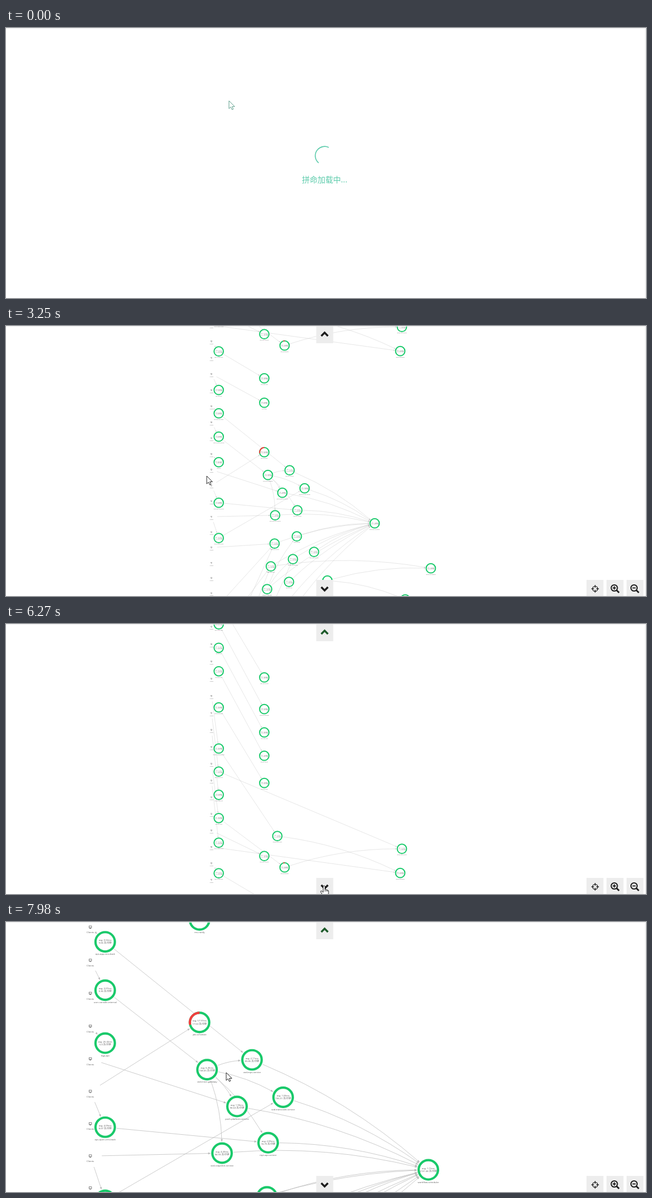
These frames come from a looping animation (1151 px wide and 486 px high, 8 s). An HTML page with a canvas:

```html
<!DOCTYPE html>
<html lang="zh">
<head>
<meta charset="utf-8">
<title>Service map</title>
<style>
html, body { margin: 0; width: 100%; height: 100%; overflow: hidden; background: #fff; }
canvas { display: block; }
</style>
</head>
<body>
<canvas id="stage" width="1151" height="486"></canvas>
<script>
const ctx = document.getElementById('stage').getContext('2d');
const W = 1151, H = 486, LOOP = 8000, READY = 300;
const CX = 573, CY = 270.5, NOTCH = 1.275, CLICK_SCROLL = 100.75, R = 8.4;
const GREEN = '#19c96a', RED = '#f23d3d', TEAL = '#5ccbab', INK = '#1d1d1d', EDGE = '#bababa';
const CJK = '"Noto Sans CJK SC", "Noto Sans CJK", sans-serif';

// Wheel notches, each zooming in by one step
const NOTCHES = [1690, 1840, 2790, 2860, 3010, 3250, 7820, 7900, 7970];
// Clicks as [press, release]
const UP_CLICKS = [[4080, 4160], [4480, 4630], [4950, 5030], [5100, 5270]];
const DOWN_CLICKS = [[6280, 6340], [6420, 6490], [6570, 6750], [6820, 6880]];
// Pointer stops as [arrive, leave, x, y]
const STOPS = [[0, 70, 401, 131], [300, 300, 354, 190], [540, 1230, 397, 231], [1310, 2240, 420, 241],
  [2320, 2320, 414, 259], [2650, 3010, 319, 270], [3250, 3400, 361, 270], [3930, 5570, 573, 21],
  [6240, 7190, 572, 472], [7690, LOOP, 396, 271]];

const zoomAt = t => NOTCH ** (NOTCHES.filter(at => t >= at).length - 6);
const released = (clicks, t) => clicks.filter(c => t >= c[1]).length;
const scrollAt = t => CLICK_SCROLL * (released(UP_CLICKS, t) - released(DOWN_CLICKS, t));
const pressedAt = t => [...UP_CLICKS, ...DOWN_CLICKS].some(([a, b]) => t >= a && t < b);

function pointerAt(t) {
  const i = STOPS.findLastIndex(s => t >= s[0]);
  const [, leave, x, y] = STOPS[i];
  if (t <= leave || i === STOPS.length - 1) return [x, y];
  const [arrive, , nx, ny] = STOPS[i + 1];
  const k = (t - leave) / (arrive - leave);
  return [x + (nx - x) * k, y + (ny - y) * k];
}

let seed = 7;
const rand = () => (seed = (seed * 16807) % 2147483647) / 2147483647;
const pick = list => list[Math.floor(rand() * list.length)];

// Graph: services stand in evenly spaced rows; each id is a group letter and an index
const groups = {}, edges = [], clients = [];
function row(group, x, y, count = 1, dy = 0, dx = 0) {
  const list = groups[group] ??= [];
  for (let i = 0; i < count; i++) list.push({
    x: x + dx * i, y: y + dy * i + 0.2, err: 0,
    avg: (rand() * 20 + 0.5).toFixed(2),
    rate: (rand() * 90 + 1).toFixed(2),
    name: pick(['vod', 'ops', 'media', 'user', 'log']) + '-' + pick(['auth', 'task', 'file', 'index', 'config'])
      + pick(['-service', '-api', '-back', '-gateway'])
  });
}
const node = id => groups[id[0]][id.slice(1)];

const entry = (...run) => row('A', 382.6, ...run);
entry(-445, 4, 42.3);
entry(-253, 2, 74);
entry(-137.5, 3, 41.8);
entry(-9.5, 2, 55);
entry(115, 3, 42);
entry(245, 2, 73);
entry(381.5);
entry(502, 14, 54.6);

const inner = (...run) => row('B', 464.5, ...run);
inner(-433);
inner(-307, 2, 57);
inner(-208, 2, 42);
inner(-117);
inner(14.5);
inner(94, 2, 44);
inner(227);
inner(709, 9, 53);

row('G', 471, 268);
row('H', 663, 355);
row('U', 484, 340.5, 3, -40.5, 13);
row('V', 524, 331.5, 2, -39.5, 13);
row('L', 483, 391.5, 3, 41, -6.7);
row('M', 523, 378.5, 5, 41, -7);
row('P', 554, 406.5, 2, 51.5, 24);
row('S', 764, 436, 2, 56, -46);
row('T', 712, 1.5, 2, 43.5, -3);
row('N', 488, -21.5, 2, 56.5, 13);
row('X', 382.6, -490, 10, -50);
row('Y', 464.5, -490, 6, -75);

for (let i = -20; i < 55; i++) clients.push({ x: 369.7, y: -398 + 31.4 * i - 0.07 * i * i });

const LABELS = `A12 0.02 9.06 ops-app-cms-back|A13 3.07 0.36 user-console-internal|A14 26.42 5.0 logs-api
A15 4.09 8.07 ops-open-cms-back|B8 8.20 3.41 ms-notify|B9 57.97 17.63 job-schedule|G0 6.45 168.65 vod-inner-gateway
U2 2.11 89.85 vod-mps-service|U1 1.96 90.63 push-platform-service|V1 1.06 106.31 vod-transcode-service
U0 4.43 84.93 vod-snapshot-service|V0 2.85 74.79 mps-api-service|H0 1.15 2131.68 workflow-scheduler`;
for (const text of LABELS.split(/[|\n]/)) {
  const [id, avg, rate, name] = text.split(' ');
  Object.assign(node(id), { avg, rate, name });
}
node('B9').err = 0.29;
node('N1').err = 0.04;

const link = (a, b, bend = 0) => edges.push({ a, b, bend });
const links = (text, bend) => text.split(' ').forEach(pair => link(...pair.split('-').map(node), bend));
const clientNear = y => clients.reduce((m, c) => Math.abs(c.y - y) < Math.abs(m.y - y) ? c : m);

for (let i = 0; i < 5; i++) link(groups.A[i], groups.B[i + 1]);
for (const a of groups.A.slice(5, 17)) link(clientNear(a.y - (a.y < 0 ? 110 : 25)), a);
for (const g of 'UV') for (const n of groups[g]) link(node('G0'), n, 0.08);
for (const g of 'UVLM') for (const n of groups[g]) link(n, node('H0'), 0.08);
for (const id of ['B6', 'B8', 'B9', 'U1', 'U0', 'L0']) {
  const n = node(id);
  link(clientNear(n.y + { B6: -60, B8: -40, B9: 62, U1: -43, U0: 0, L0: 20 }[id]), n);
}
link(clientNear(0), node('T1'));
links('A5-N0 A6-T0 A8-N1 A10-B7 A12-U2 A13-G0 A15-V0 A16-V1 A17-L0 A18-L1 A19-L0 A20-L1 A21-M1', 0);
links('N0-T1 N1-T0 P0-H0 L1-S0 P1-S0 P1-S1 L2-M1 L2-M0', 0.08);

function drawEdge({ a, b, bend }, z) {
  const dx = b.x - a.x, dy = b.y - a.y;
  const mx = (a.x + b.x) / 2 + dy * bend, my = (a.y + b.y) / 2 - dx * bend;
  const toward = (p, d) => {
    const l = Math.hypot(mx - p.x, my - p.y);
    return [p.x + (mx - p.x) / l * d, p.y + (my - p.y) / l * d];
  };
  const s = toward(a, 10), e = toward(b, 10);
  ctx.beginPath();
  ctx.moveTo(...s);
  ctx.quadraticCurveTo(mx, my, ...e);
  ctx.stroke();
  if (z < 0.7) return;
  const ang = Math.atan2(b.y - my, b.x - mx);
  ctx.beginPath();
  ctx.moveTo(...e);
  for (const side of [2.7, -2.7])
    ctx.lineTo(e[0] + Math.cos(ang + side) * 2.2, e[1] + Math.sin(ang + side) * 2.2);
  ctx.fill();
}

function drawService(n, z) {
  const up = -Math.PI / 2;
  ctx.lineWidth = 2;
  ctx.fillStyle = '#fff';
  ctx.strokeStyle = GREEN;
  ctx.beginPath();
  ctx.arc(n.x, n.y, R, 0, 7);
  ctx.fill();
  ctx.stroke();
  if (n.err) {
    ctx.strokeStyle = RED;
    ctx.beginPath();
    ctx.arc(n.x, n.y, R, up - n.err * 2 * Math.PI, up);
    ctx.stroke();
  }
  if (z < 0.4) return;
  ctx.fillStyle = '#555';
  ctx.fillText(`avg. ${n.avg}ms`, n.x, n.y - 1.2);
  ctx.fillText(`${n.rate} 次/分钟`, n.x, n.y + 1.3);
  ctx.fillText(n.name, n.x, n.y + 10.9);
}

function drawClient(n, z) {
  ctx.strokeStyle = ctx.fillStyle = '#555';
  ctx.lineWidth = 0.35;
  ctx.strokeRect(n.x - 1.1, n.y - 1.1, 2.2, 1.6);
  ctx.fillRect(n.x - 0.7, n.y + 0.8, 1.4, 0.4);
  if (z > 0.4) ctx.fillText('Clients', n.x, n.y + 4.8);
}

function drawGraph(z, shift) {
  const visible = n => Math.abs((n.y + shift - CY) * z) < H / 2 + 45;
  ctx.save();
  ctx.translate(CX, CY);
  ctx.scale(z, z);
  ctx.translate(-CX, shift - CY);
  ctx.font = `2px "Open Sans", ${CJK}`;
  ctx.textAlign = 'center';
  ctx.textBaseline = 'middle';
  ctx.strokeStyle = ctx.fillStyle = EDGE;
  ctx.lineWidth = 0.36;
  for (const e of edges) drawEdge(e, z);
  for (const n of clients.filter(visible)) drawClient(n, z);
  for (const n of Object.values(groups).flat().filter(visible)) drawService(n, z);
  ctx.restore();
}

function line(points, width, color = INK) {
  ctx.lineWidth = width;
  ctx.strokeStyle = color;
  ctx.beginPath();
  points.forEach(p => ctx.lineTo(...p));
  ctx.stroke();
}
function ring(x, y, r, width) {
  ctx.lineWidth = width;
  ctx.strokeStyle = INK;
  ctx.beginPath();
  ctx.arc(x, y, r, 0, 7);
  ctx.stroke();
}
const chevron = (y, dir, color) => line([[CX - 6, y + 3 * dir], [CX, y - 3 * dir], [CX + 6, y + 3 * dir]], 3.4, color);

function drawButtons(t) {
  ctx.fillStyle = '#ededed';
  ctx.fillRect(558, 1, 30.5, 30);
  for (const x of [558, 1044, 1080, 1116]) ctx.fillRect(x, 457, 30.5, 29);
  chevron(15, 1, t >= UP_CLICKS[0][0] ? '#1d5a2a' : INK);
  chevron(473, -1, INK);

  ring(1059.5, 473, 4.6, 1.4);
  for (const s of [-1, 1]) {
    line([[1059.5 + s * 2, 473], [1059.5 + s * 6.8, 473]], 1.4);
    line([[1059.5, 473 + s * 2], [1059.5, 473 + s * 6.8]], 1.4);
  }
  for (const x of [1094, 1129.5]) {
    ring(x, 471.5, 5.6, 2);
    line([[x + 4, 475.5], [x + 8.6, 480]], 2.8);
    line([[x - 3, 471.5], [x + 3, 471.5]], 1.8);
  }
  line([[1094, 468.5], [1094, 474.5]], 1.8);
}

const ARROW = new Path2D('M0 0V14.2L3.2 11.2L5.6 16L7.8 15L5.6 10.4H10.2Z');
const HAND = new Path2D('M-1.6 11V1Q-1.6-1 0-1Q1.6-1 1.6 1V6Q3.2 5 4 6.6Q5.5 5.8 6.2 7.4Q8 7 8 9V12.5'
  + 'Q8 15 6.4 17.5H-1.2Q-3.4 14-6 10.5Q-6.6 8-4 8.6Z');

function drawPointer(t) {
  const [x, y] = pointerAt(t);
  const overButton = Math.abs(x - CX) < 15 && (y < 31 || y > 457);
  if (pressedAt(t)) {
    ctx.fillStyle = 'rgba(255,245,20,.6)';
    ctx.beginPath();
    ctx.arc(x - 1, y - 0.5, 10.3, 0, 7);
    ctx.fill();
  }
  ctx.save();
  ctx.translate(x, y);
  ctx.fillStyle = '#fff';
  ctx.strokeStyle = t < READY ? '#5f9f8c' : '#222';
  ctx.lineWidth = 1;
  const shape = overButton ? HAND : ARROW;
  ctx.fill(shape);
  ctx.stroke(shape);
  if (overButton) for (const fx of [1.6, 4, 6.2]) line([[fx, 6.5], [fx, 9.5]], 0.8);
  ctx.restore();
}

function drawLoader(t) {
  const tail = (132 + t * 0.21) * Math.PI / 180, span = (162 + t * 0.1) * Math.PI / 180;
  ctx.strokeStyle = ctx.fillStyle = TEAL;
  ctx.lineWidth = 1.7;
  ctx.lineCap = 'round';
  ctx.beginPath();
  ctx.arc(CX, 230, 16.8, tail, tail + span);
  ctx.stroke();
  ctx.lineCap = 'butt';
  ctx.font = `14px ${CJK}`;
  ctx.textAlign = 'center';
  ctx.textBaseline = 'alphabetic';
  ctx.fillText('拼命加载中...', CX, 277.5);
}

function draw(t) {
  ctx.fillStyle = '#fff';
  ctx.fillRect(0, 0, W, H);
  if (t < READY) drawLoader(t);
  else {
    drawGraph(zoomAt(t), scrollAt(t));
    drawButtons(t);
  }
  ctx.fillStyle = '#ececec';
  ctx.fillRect(0, 0, W, 1);
  ctx.fillStyle = '#f0f0f0';
  ctx.fillRect(1149, 0, 2, H);
  drawPointer(t);
}

const start = performance.now();
function tick() {
  draw((performance.now() - start) % LOOP);
  requestAnimationFrame(tick);
}
tick();
</script>
</body>
</html>
```
